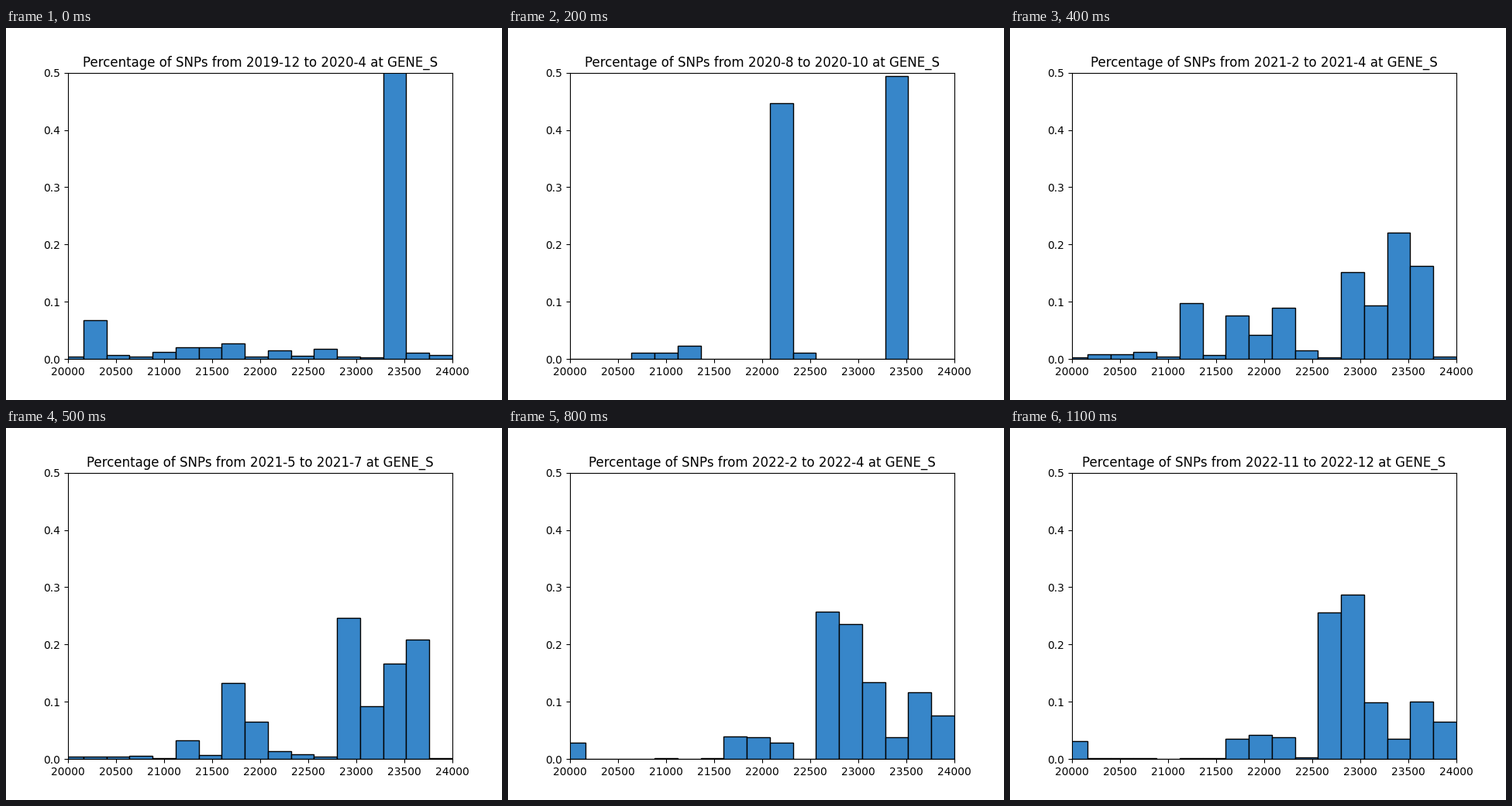
A matplotlib script that plays this animation: 640x480 px, repeating every 1.2 s.

```python
import matplotlib.pyplot as plt
import numpy as np
from matplotlib.animation import FuncAnimation

N_PERIODS = 12
BIN_WIDTH = 240
EDGES = 19920 + BIN_WIDTH * np.arange(17)

# Share of SNPs per bin, in thousandths, by period
SHARES = {
    0: [4, 68, 7, 4, 12.5, 20.5, 20.5, 27.5, 4, 15, 6, 18, 4, 3, 768, 11, 7],
    2: [0, 0, 0, 11, 11, 23, 0, 0, 0, 447, 11, 0, 0, 0, 494, 0, 0],
    3: [3, 12, 12, 18, 7, 161, 8, 20, 20, 164, 23, 3, 56, 94, 274, 117, 8],
    5: [4, 4, 4, 6, 1, 33, 7, 133, 65, 14, 8, 4, 247, 92, 167, 209, 1],
    7: [3, 1, 4, 1, 6, 10, 3, 72, 69, 11, 3, 154, 245, 148, 70, 141, 60],
    8: [29, 0, 0, 0, 1, 0, 1, 39, 38, 29, 0, 257, 236, 134, 38, 117, 76],
    11: [31, 1, 1, 1, 0, 1, 1, 35, 42, 38, 3, 256, 287, 99, 35, 100, 65],
}
KNOWN = list(SHARES)
TABLE = np.array(list(SHARES.values())) / 1000


def heights(period):
    return [np.interp(period, KNOWN, column) for column in TABLE.T]


def month_label(month):
    """Format a month counted from January 2020."""
    return f"{2020 + month // 12}-{month % 12 + 1}"


def title(period):
    first = 3 * period + 1 if period else -1
    last = min(3 * period + 3, 35)
    return (f"Percentage of SNPs from {month_label(first)} "
            f"to {month_label(last)} at GENE_S")


fig, ax = plt.subplots(figsize=(6.4, 4.8), dpi=100)
bars = ax.bar(EDGES, heights(0), width=BIN_WIDTH, align="edge",
              color="#3786c9", edgecolor="black", linewidth=1)
ax.set_xlim(20000, 24000)
ax.set_ylim(0, 0.5)
heading = ax.set_title(title(0))


def update(period):
    for bar, height in zip(bars, heights(period)):
        bar.set_height(height)
    heading.set_text(title(period))
    return [*bars, heading]


anim = FuncAnimation(fig, update, frames=N_PERIODS, interval=100,
                     repeat=True, repeat_delay=0)
plt.show()
```
